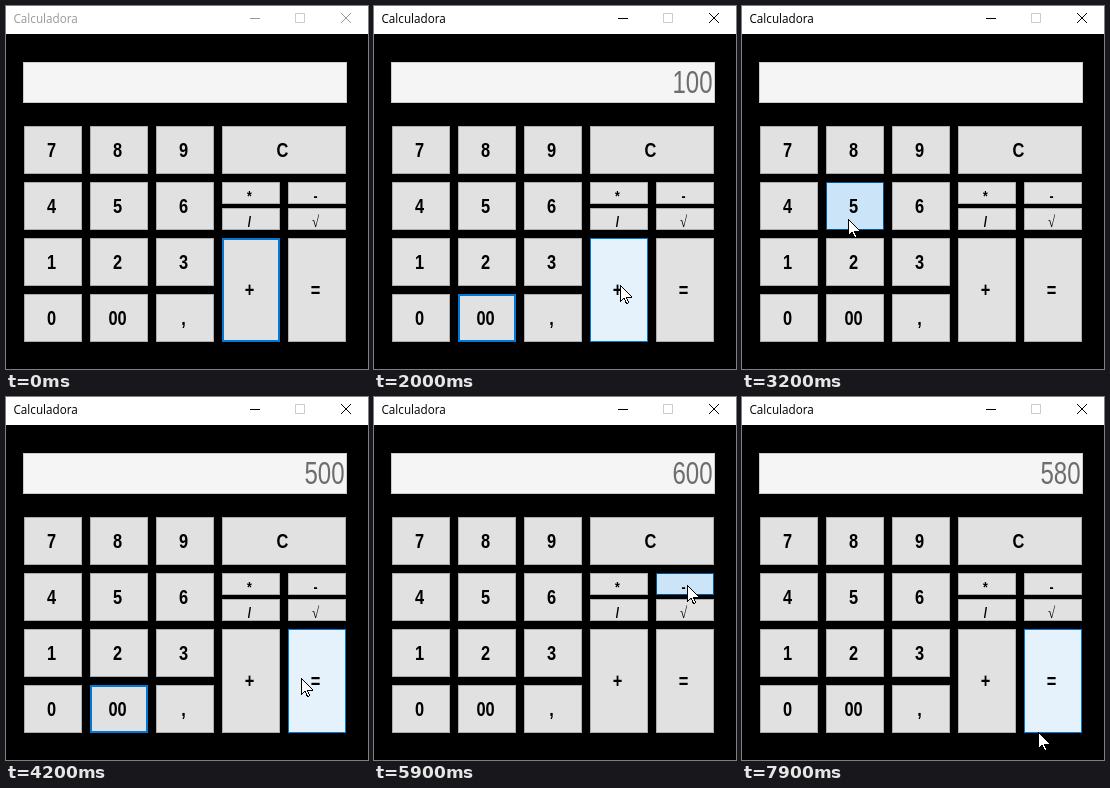
These frames come from a looping animation (362x363 px, 8 s). An HTML page:

```html
<!DOCTYPE html>
<html lang="pt">
<head>
<meta charset="utf-8">
<title>Calculadora</title>
<style>
  html, body { margin: 0; width: 100%; height: 100%; overflow: hidden; background: #000; }
  svg { display: block; width: 362px; height: 363px; }
  text { font-family: "Liberation Sans", Arial, sans-serif; }
  .key rect { fill: #e1e1e1; stroke: #adadad; stroke-width: 1; }
  .key text { font-weight: bold; text-anchor: middle; }
  .key .root { font: 16px "Liberation Serif", serif; }
  .key.focus rect { stroke: #0078d7; stroke-width: 3; }
  .key.hover rect { fill: #e5f1fb; stroke: #0078d7; stroke-width: 1; }
  .key.press rect { fill: #cce4f7; stroke: #005499; stroke-width: 1; }
  #caption { font: 11.7px "Open Sans", "Noto Sans", sans-serif; }
  #bar { fill: #000; stroke: #000; }
  #bar.inactive { fill: #999; stroke: #999; }
  #bar text { stroke: none; }
  #bar path { fill: none; }
  #readout { font-size: 32px; fill: #6d6d6d; text-anchor: end; }
</style>
</head>
<body>
<svg viewBox="0 0 362 363">
  <rect width="362" height="363"/>
  <rect width="362" height="28" fill="#fff"/>
  <g id="bar">
    <text id="caption" x="7.5" y="17">Calculadora</text>
    <path d="M244 12.5h10"/>
    <path d="M289.5 7.5h9v9h-9z" style="stroke:#ccc"/>
    <path d="M335 7l10 10m0-10l-10 10"/>
  </g>
  <rect x="17.5" y="56.5" width="323" height="40" fill="#f5f5f5" stroke="#ccc"/>
  <text id="readout" transform="translate(338.5 86.5) scale(.75 1)"></text>
  <g id="keys"></g>
  <path id="cursor" d="M.5.5V16.5L4 13 6.5 18.5H7.5L8.5 17.5 6.5 12.5H11.5V11.5Z"
    fill="#fff" stroke="#000" shape-rendering="crispEdges"/>
</svg>
<script>
const LOOP = 8000, TICK = 100, ENTER = 300, MAX_MOVE = 500;
const $ = id => document.getElementById(id);

function add(parent, tag, attrs) {
  const node = document.createElementNS("http://www.w3.org/2000/svg", tag);
  for (const name in attrs) node.setAttribute(name, attrs[name]);
  return parent.appendChild(node);
}

// Grid position in columns and rows, then optional size and vertical offset.
const keys = [];
function addKey(label, col, row, width = 58, height = 48, dy = 0) {
  const x = 18 + 66 * col, y = 120 + 56 * row + dy, small = height < 48;
  const node = add($("keys"), "g", { class: "key" });
  // The clip keeps the wide focus outline inside the key.
  const clip = add(node, "clipPath", { id: `clip${keys.length}` });
  add(clip, "rect", { x, y, width, height });
  add(node, "rect", {
    x: x + .5, y: y + .5, width: width - 1, height: height - 1,
    "clip-path": `url(#${clip.id})`
  });
  const text = add(node, "text", {
    class: label === "√" ? "root" : "",
    transform: `translate(${x + width / 2 - 1.5} ${y + height / 2 + (small ? 8 : 7)}) scale(.82 1)`,
    "font-size": small ? 15 : 20
  });
  text.textContent = label;
  keys.push({ label, x, y, width, height, node });
}

["789", "456", "123"].forEach((line, row) =>
  [...line].forEach((digit, col) => addKey(digit, col, row)));
["0", "00", ","].forEach((label, col) => addKey(label, col, 3));
["*-", "/√"].forEach((line, row) =>
  [...line].forEach((label, col) => addKey(label, 3 + col, 1, 58, 22, 26 * row)));
addKey("C", 3, 0, 124);
["+", "="].forEach((label, col) => addKey(label, 3 + col, 2, 58, 104));

// Pointer stops: arrival time and tip position.
const stops = [
  [ENTER, 104, 47], [900, 48, 260], [1600, 106, 327], [2000, 246, 279],
  [3100, 106, 213], [3600, 105, 313], [4200, 295, 281], [4900, 313, 319],
  [5400, 268, 228], [5700, 313, 188], [6400, 110, 262], [6800, 86, 290],
  [7000, 48, 310], [7400, 334, 300], [7900, 296, 335]
];
const clicks = [1200, 1600, 2300, 3200, 3600, 4500, 5900, 6600, 7000, 7600];

const smooth = k => k * k * (3 - 2 * k);

// The pointer waits for the last click to end, then eases to its next stop.
function pointerAt(t) {
  if (t < ENTER) return null;
  const next = stops.findIndex(([arrive]) => arrive > t);
  if (next < 0) return stops[stops.length - 1].slice(1);
  const [before, x0, y0] = stops[next - 1], [arrive, x1, y1] = stops[next];
  const releases = clicks.map(time => time + TICK).filter(time => time < arrive);
  const leave = Math.max(before, arrive - MAX_MOVE, ...releases);
  const k = smooth(Math.max(0, (t - leave) / (arrive - leave)));
  return [Math.round(x0 + (x1 - x0) * k), Math.round(y0 + (y1 - y0) * k)];
}

function keyAt(point) {
  if (!point) return undefined;
  const [x, y] = point;
  return keys.find(key => x >= key.x && x < key.x + key.width
    && y >= key.y && y < key.y + key.height);
}

function calculate(labels) {
  let total = 0, operator = "+", entry = "";
  for (const label of labels) {
    if (/\d/.test(label)) {
      entry += label;
    } else if (label === "=") {
      total += operator === "-" ? -entry : +entry;
      entry = String(total);
    } else {
      total = +entry;
      operator = label;
      entry = "";
    }
  }
  return entry;
}

const clicked = clicks.map(time => keyAt(pointerAt(time)));

function render(t) {
  const pointer = pointerAt(t), hovered = keyAt(pointer);
  const started = clicks.filter(time => time <= t).length;
  const released = clicks.filter(time => time + TICK <= t).length;
  const focused = started ? clicked[started - 1] : keys.find(key => key.label === "+");

  for (const key of keys) {
    const state = key === focused && started > released ? "press"
      : key === hovered ? "hover"
      : key === focused ? "focus" : "";
    key.node.setAttribute("class", `key ${state}`);
  }

  $("bar").setAttribute("class", started ? "" : "inactive");
  $("readout").textContent = calculate(clicked.slice(0, released).map(key => key.label));
  $("cursor").style.display = pointer ? "" : "none";
  if (pointer) $("cursor").setAttribute("transform", `translate(${pointer})`);
}

const start = performance.now();
function frame() {
  const t = (performance.now() - start) % LOOP;
  render(Math.floor(t / TICK) * TICK);
  requestAnimationFrame(frame);
}
frame();
</script>
</body>
</html>
```
